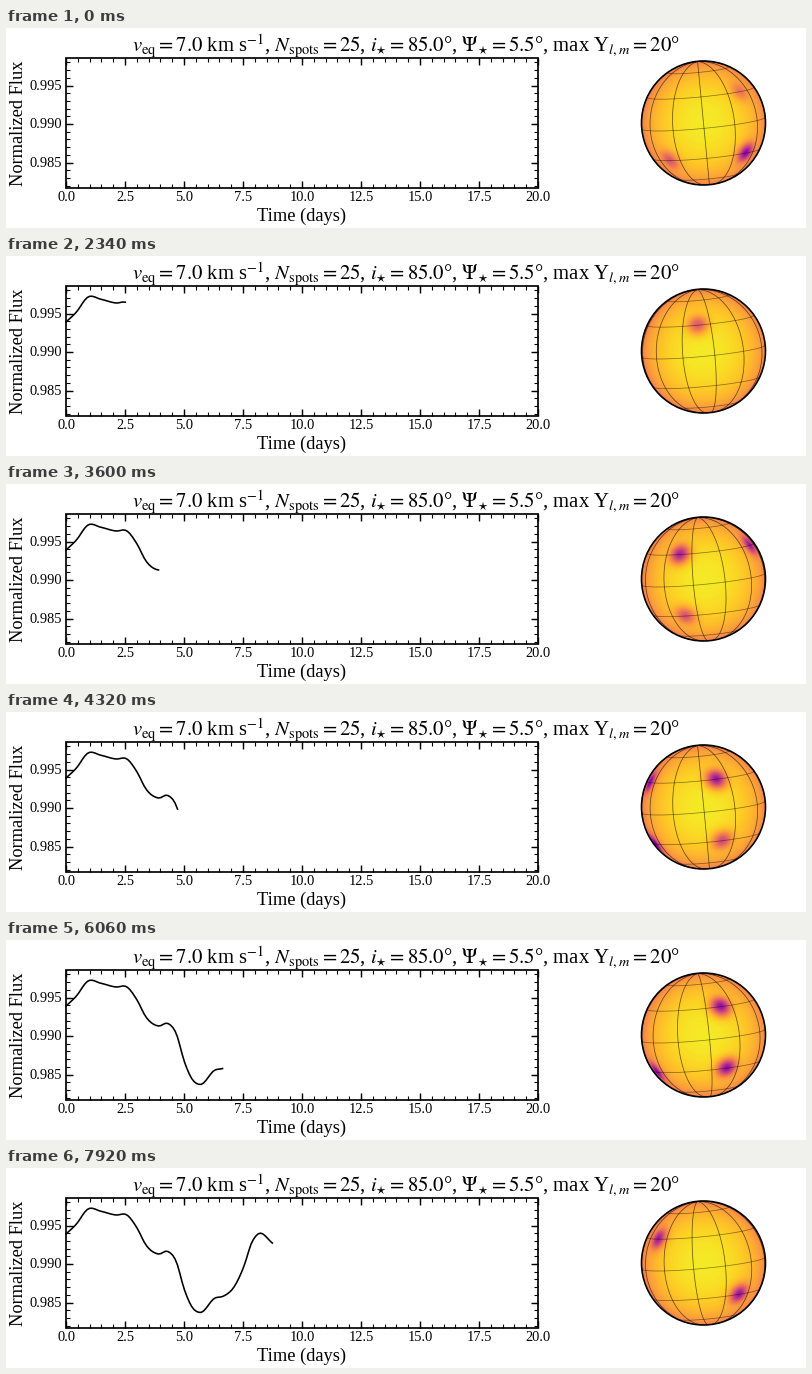
A matplotlib script for the animation above (8 s loop, 800 by 200 pixels).

```python
import numpy as np
import matplotlib.pyplot as plt
from matplotlib.animation import FuncAnimation
from matplotlib.collections import LineCollection
from matplotlib.patches import Circle, Rectangle

W, H, DPI = 800, 200, 100
LOOP_MS, STEP_MS = 8000, 20
PT = 72 / DPI

plt.rcParams.update({
    "font.family": "Liberation Serif",
    "mathtext.fontset": "stix",
})

fig = plt.figure(figsize=(W / DPI, H / DPI), dpi=DPI, facecolor="white")
ax = fig.add_axes([0, 0, 1, 1])
ax.set_axis_off()

# ---------- plot frame ----------
LEFT, RIGHT, TOP, BOTTOM = 60, 532, 30, 160


def day_x(day):
    return LEFT + (RIGHT - LEFT) / 20 * day


def flux_y(flux):
    return 57.5 + (0.995 - flux) * 7700


def label(x, y, text, size, **kw):
    ax.text(x, y, text, fontsize=size * PT, va="baseline", **kw)


def add_ticks(xs, ys, length, width):
    segs = []
    for x in xs:
        segs += [[(x, BOTTOM), (x, BOTTOM - length)], [(x, TOP), (x, TOP + length)]]
    for y in ys:
        segs += [[(LEFT, y), (LEFT + length, y)], [(RIGHT, y), (RIGHT - length, y)]]
    ax.add_collection(LineCollection(segs, colors="k", linewidths=width * PT))


ax.add_patch(Rectangle((LEFT, TOP), RIGHT - LEFT, BOTTOM - TOP,
                       fill=False, ec="k", lw=1.7 * PT))
major_days = np.arange(0, 20.1, 2.5)
major_flux = np.array([0.985, 0.990, 0.995])
add_ticks(day_x(major_days), flux_y(major_flux), 7, 1.4)
add_ticks(day_x(np.arange(0.5, 20, 0.5)),
          flux_y(np.arange(982, 999) / 1000), 4, 1.1)

for d in major_days:
    label(day_x(d), 173.4, f"{d:.1f}", 14.4, ha="center")
for f in major_flux:
    label(56, flux_y(f) + 4.4, f"{f:.3f}", 14.4, ha="right")
label(296, 192.8, "Time (days)", 18.5, ha="center")
label(17, 95.5, "Normalized Flux", 18.4, ha="center",
      rotation=90, rotation_mode="anchor")
label(400, 23, r"$v_{\rm eq}=7.0$ km s$^{-1}$, $N_{\rm spots}=25$, "
      r"$i_{\star}=85.0$°, $\Psi_{\star}=5.5$°, "
      r"max Y$_{l,m}=20$°", 20.6, ha="center")

# ---------- light curve ----------
# bends of the curve, in pixels
KNOTS = np.array([
    (60, 66), (70, 56.5), (82, 41), (95, 43.3), (110, 47), (121, 47),
    (131, 60), (140, 77), (152.5, 86), (162, 83.5), (170, 93), (178.5, 122),
    (186, 139), (194, 144.5), (209, 130), (217, 128.3), (228, 119),
    (238, 98), (246, 74), (252, 66), (267, 75.5)])


def smooth(x, kx, ky):
    """Cubic Hermite curve through the knots."""
    slope = np.gradient(ky, kx)
    i = np.clip(np.searchsorted(kx, x) - 1, 0, len(kx) - 2)
    h = kx[i + 1] - kx[i]
    u = (x - kx[i]) / h
    return (ky[i] * (1 + 2 * u) * (1 - u) ** 2 + ky[i + 1] * u * u * (3 - 2 * u)
            + h * u * (1 - u) * (slope[i] * (1 - u) - slope[i + 1] * u))


DAYS_PER_STEP = 20 / 199
curve_x = day_x(np.arange(89) * DAYS_PER_STEP)
curve_y = smooth(curve_x, *KNOTS.T)
curve, = ax.plot([], [], color="k", lw=1.6 * PT, solid_joinstyle="round")

# ---------- star ----------
CX, CY, R, HALF = 697.5, 95, 62, 63
TILT, ROLL = np.radians(5), np.radians(5.5)
PERIOD = 7.23


def to_sky(lat, lon):
    """Unit vector with x right, y up and z towards the viewer."""
    x, y, z = np.cos(lat) * np.sin(lon), np.sin(lat), np.cos(lat) * np.cos(lon)
    y, z = (y * np.cos(TILT) - z * np.sin(TILT),
            y * np.sin(TILT) + z * np.cos(TILT))
    return (x * np.cos(ROLL) - y * np.sin(ROLL),
            x * np.sin(ROLL) + y * np.cos(ROLL), z)


def grid_path(lats, lons):
    """Visible part of a set of curves, as one broken line."""
    x, y, z = to_sky(lats, lons)
    x = np.where(z < 0, np.nan, x)
    x, y = (np.pad(v, ((0, 0), (0, 1)), constant_values=np.nan) for v in (x, y))
    return CX + R * x.ravel(), CY - R * y.ravel()


# Spots sit on two belts, a quarter turn apart; contrast grows from start to end.
BELTS = [
    (30.5, (0.22, 0.15, 0.35, 0), (0.66, 0.64, 0.58, 0)),
    (-29.5, (0.66, 0.05, 0, 0.33), (0.66, 0.42, 0, 0.62)),
]
SPOT_WIDTH = 0.115

axis = ((np.arange(2 * HALF) + 0.5) / HALF - 1) * HALF / R
gx, gy = np.meshgrid(axis, -axis)
rad = np.maximum(np.hypot(gx, gy), 1)
gx, gy = gx / rad, gy / rad
mu = np.sqrt(np.clip(1 - gx ** 2 - gy ** 2, 0, 1))
disk = 0.965 - 0.33 * (1 - mu)


def surface(step, phase):
    img = disk.copy()
    u = np.clip((step - 20) / 25, 0, 1)
    grown = u * u * (3 - 2 * u)
    for lat, start, end in BELTS:
        for n, (a, b) in enumerate(zip(start, end)):
            x, y, z = to_sky(np.radians(lat), np.radians(46 + 90 * n) + phase)
            dot = gx * x + gy * y + mu * z
            img *= 1 - (a + (b - a) * grown) * np.exp((dot - 1) / SPOT_WIDTH ** 2)
    return img


edge = Circle((CX, CY), R, fill=False, ec="k", lw=1.6 * PT, zorder=5)
ax.add_patch(edge)
star = ax.imshow(disk, cmap="plasma", vmin=0, vmax=1, aspect="auto",
                 extent=(CX - HALF, CX + HALF, CY + HALF, CY - HALF),
                 interpolation="bilinear")
star.set_clip_path(edge)

grid_style = dict(color="k", lw=0.75 * PT, zorder=4)
parallels = np.radians(np.arange(-60, 61, 30))[:, None]
around = np.linspace(-np.pi, np.pi, 181)[None, :]
ax.plot(*grid_path(parallels, around), alpha=0.45, **grid_style)
meridians = np.radians(np.arange(0, 360, 30))[:, None]
pole_to_pole = np.linspace(-np.pi / 2, np.pi / 2, 91)[None, :]
lon_lines, = ax.plot([], [], alpha=0.6, **grid_style)

ax.set_xlim(0, W)
ax.set_ylim(H, 0)


def update(i):
    # poses last 120 ms and 60 ms in turn
    pair, rest = divmod(i * STEP_MS, 180)
    step = 2 * pair + (rest >= 120)
    phase = 2 * np.pi * step * DAYS_PER_STEP / PERIOD
    curve.set_data(curve_x[:step], curve_y[:step])
    star.set_data(surface(step, phase))
    lon_lines.set_data(*grid_path(pole_to_pole, meridians + phase))
    return curve, star, lon_lines


anim = FuncAnimation(fig, update, frames=LOOP_MS // STEP_MS, interval=STEP_MS,
                     repeat=True, repeat_delay=0, blit=False)
plt.show()
```
